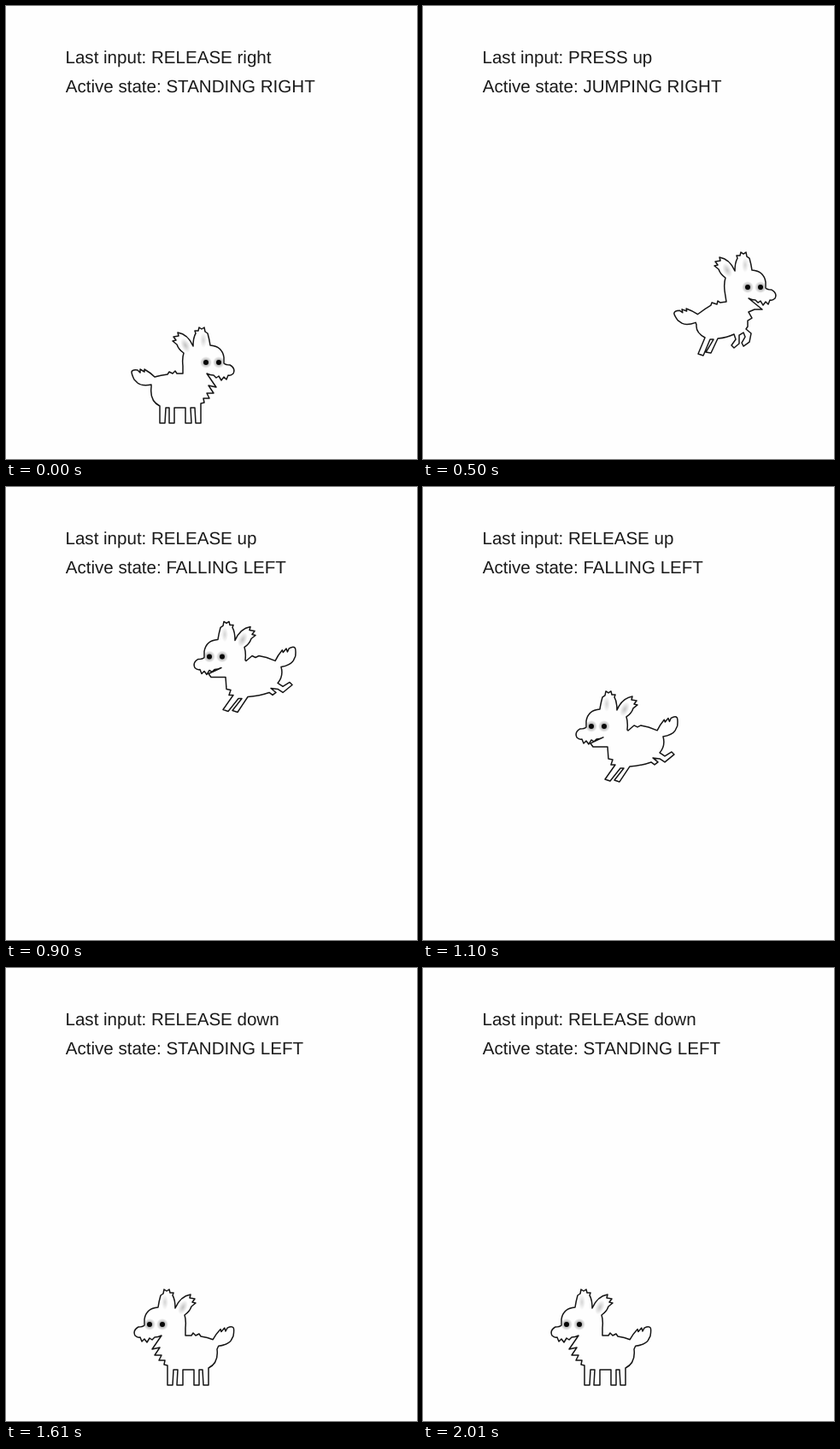
An HTML page that plays this animation: 481x530 px, repeating every 2110 ms.

```html
<!DOCTYPE html>
<html lang="en">
<head>
<meta charset="utf-8">
<title>Dog state machine</title>
<style>
  html, body { margin: 0; width: 100%; height: 100%; overflow: hidden; background: #fefefe; }
  svg { display: block; width: 481px; height: 530px; }
  text {
    font: 20.55px "Liberation Sans", Arial, sans-serif;
    fill: #1a1a1a;
    white-space: pre;
    text-rendering: geometricPrecision;
  }
  #outline { fill: #fefefe; stroke: #151515; stroke-width: 1.5; stroke-linejoin: round; }
</style>
</head>
<body>
<svg viewBox="0 0 481 530">
  <defs>
    <radialGradient id="shade">
      <stop offset="0" stop-color="#888" stop-opacity=".5"/>
      <stop offset="1" stop-color="#888" stop-opacity="0"/>
    </radialGradient>
    <radialGradient id="halo">
      <stop offset=".35" stop-color="#777" stop-opacity=".6"/>
      <stop offset="1" stop-color="#777" stop-opacity="0"/>
    </radialGradient>
    <g id="eye">
      <circle r="7" fill="url(#halo)"/>
      <circle r="3" fill="#080808"/>
    </g>
  </defs>
  <text id="input" x="69.5" y="67"></text>
  <text id="state" x="69.8" y="101"></text>
  <g id="dog">
    <path id="outline"/>
    <ellipse cx="210" cy="397" rx="5" ry="9" transform="rotate(-25 210 397)" fill="url(#shade)"/>
    <ellipse cx="231" cy="391" rx="4" ry="9" fill="url(#shade)" opacity=".7"/>
    <use href="#eye" x="234" y="417"/>
    <use href="#eye" x="249" y="417"/>
  </g>
</svg>
<script>
const LOOP = 2110;
const $ = id => document.getElementById(id);

// Outline pieces run clockwise for a dog facing right: head, underside, tail, back.
const HEAD = `M207 421 Q206 412 208 406 Q202 402 200 396 L195 392 L199 391 L196 387
  L202 386 L201 382 Q213 384 219 398 Q219 388 222 383 L221 380 L225 380 L226 376
  L229 378 L232 376 L233 381 L236 383 Q238 390 239 397 Q253 398 255 411 L255 418
  Q257 420 262 420 Q269 424 266 430 Q263 433 260 432 L258 437 L255 434 L252 438
  L249 433 L246 435 L243 432 Q239 432 235 430 `;

const TAIL = `L-2 6 Q-13 8 -18 4 L-22 0 Q-25 -6 -25 -9 Q-24 -12 -18 -11 L-15 -8
  L-15 -12 L-10 -9 L-10 -12 Q-3 -8 2 -3 `;

const CHEST = "L246 446 L237 444 L243 453 L235 453 L238 459 L231 459 L232 464 L228 465 ";
const JAW = "L251 443 L242 443 L235 446 L239 453 L234 456 L234 463 ";
const BACK = "Q181 432 189 431 L191 428 L195 430 L198 427 L200 430 L207 430 Z";

const STAND_LEGS = `L228 488 L222 488 L221 470 L216 470 L217 488 L210 488 L210 470
  L197 470 L197 488 L191 488 L191 470 L187 470 L186 488 L180 488 L180 468
  Q168 462 170 446 `;

const GATHER_LEGS = `L231 465 L232 473 L225 483 L220 480 L228 472 L224 466 L219 467
  L221 473 L213 483 L208 479 L217 473 L213 468 L206 468 L203 474 L206 482 L200 483
  L196 475 L198 468 L194 468 L190 481 L184 481 L188 468 Q172 462 171 446 `;

const STRETCH_LEGS = `L231 464 L242 480 L236 483 L224 468 L219 468 L231 483 L225 486
  L211 469 L196 469 L186 484 L180 481 L188 468 L184 467 L173 480 L167 477 L178 465
  Q169 458 171 446 `;

const JUMP_LEGS = `L232 466 L238 471 L236 481 L229 486 L227 482 L231 475 L229 470
  L224 473 L224 483 L218 488 L215 485 L220 478 L218 472 Q210 476 199 477 L191 494
  L185 493 L194 478 L190 478 L182 497 L176 495 L184 476 Q173 470 174 461 `;

const FALL_FRONT = `L250 437 L247 441 L230 441 L229 455 L224 456 L226 462 L221 462
  L233 479 L227 481 L215 466 L211 466 L222 480 L216 482 L204 464 `;
const FALL_REAR = `Q190 463 179 459 L175 462 L171 459 L177 454 L169 455 L163 459
  L152 450 L155 447 L163 452 L169 448 Q162 440 165 429 `;

const SIT_LEGS = `L249 460 L249 466 L232 466 L229 463 L227 466 L211 466 L206 462
  L205 466 L182 466 Q167 462 170 446 `;

function tail(x, y, degrees) {
  const a = degrees * Math.PI / 180, c = Math.cos(a), s = Math.sin(a);
  return TAIL.replace(/(-?\d+) (-?\d+)/g, (_, u, v) =>
    `${(x + u * c - v * s).toFixed(1)} ${(y + u * s + v * c).toFixed(1)}`);
}

const stand = wag => HEAD + CHEST + STAND_LEGS + tail(172, 437, wag) + BACK;
const POSES = {
  stand: stand(0),
  standMid: stand(9),
  standUp: stand(17),
  gather: HEAD + JAW + GATHER_LEGS + tail(172, 437, 0) + BACK,
  stretch: HEAD + JAW + STRETCH_LEGS + tail(172, 437, 8) + BACK,
  jump: HEAD + JAW + JUMP_LEGS + tail(174, 452, -10) +
    "Q184 442 191 438 L192 435 L198 437 L199 433 L202 435 L209 434 Z",
  fall: HEAD + FALL_FRONT + FALL_REAR + tail(169, 424, 20) +
    "L182 418 L191 416 L195 418 L199 416 L206 422 Z",
  sit: HEAD + CHEST + SIT_LEGS + tail(172, 437, 0) + BACK
};

// Start, pose, x (mirror sum when facing left), extra y, last input, active state.
const STEPS = [
  [0, "stand", 0, 0, "RELEASE right", "STANDING RIGHT"],
  [100, "stretch", 32, 2, "PRESS right", "RUNNING RIGHT"],
  [200, "gather", 63, 4, "PRESS right", "RUNNING RIGHT"],
  [300, "stretch", 95, 2, "PRESS right", "RUNNING RIGHT"],
  [400, "gather", 126, 4, "PRESS right", "RUNNING RIGHT"],
  [500, "jump", 146, 0, "PRESS up", "JUMPING RIGHT"],
  [600, "jump", 561, 0, "PRESS left", "JUMPING LEFT"],
  [680, "jump", 541, 0, "PRESS left", "JUMPING LEFT"],
  [790, "jump", 514, 0, "RELEASE up", "JUMPING LEFT"],
  [900, "fall", 487, 0, "RELEASE up", "FALLING LEFT"],
  [980, "fall", 470, 0, "RELEASE up", "FALLING LEFT"],
  [1090, "fall", 446, 0, "RELEASE up", "FALLING LEFT"],
  [1200, "fall", 423, 0, "RELEASE up", "FALLING LEFT"],
  [1310, "stand", 417, 0, "RELEASE left", "STANDING LEFT"],
  [1410, "sit", 417, 22, "PRESS down", "SITTING LEFT"],
  [1610, "standUp", 417, 0, "RELEASE down", "STANDING LEFT"],
  [1710, "standMid", 417, 0, "RELEASE down", "STANDING LEFT"],
  [1810, "stand", 417, 0, "RELEASE down", "STANDING LEFT"],
  [1910, "standMid", 417, 0, "RELEASE down", "STANDING LEFT"],
  [2010, "standUp", 417, 0, "RELEASE down", "STANDING LEFT"]
];

// Ballistic arc between take-off and landing.
const lift = t => Math.max(0, 0.00128 * (t - 408) * (1247 - t));

let shown;
function show(step) {
  if (step === shown) return;
  shown = step;
  const [t, pose, x, drop, input, state] = step;
  const dir = state.endsWith("LEFT") ? -1 : 1;
  $("outline").setAttribute("d", POSES[pose]);
  $("dog").setAttribute("transform", `translate(${x} ${drop - lift(t)}) scale(${dir} 1)`);
  $("input").textContent = "Last input: " + input;
  $("state").textContent = "Active state: " + state;
}

const start = performance.now();
function tick() {
  const t = (performance.now() - start) % LOOP;
  show(STEPS.findLast(step => step[0] <= t));
  requestAnimationFrame(tick);
}
tick();
</script>
</body>
</html>
```
